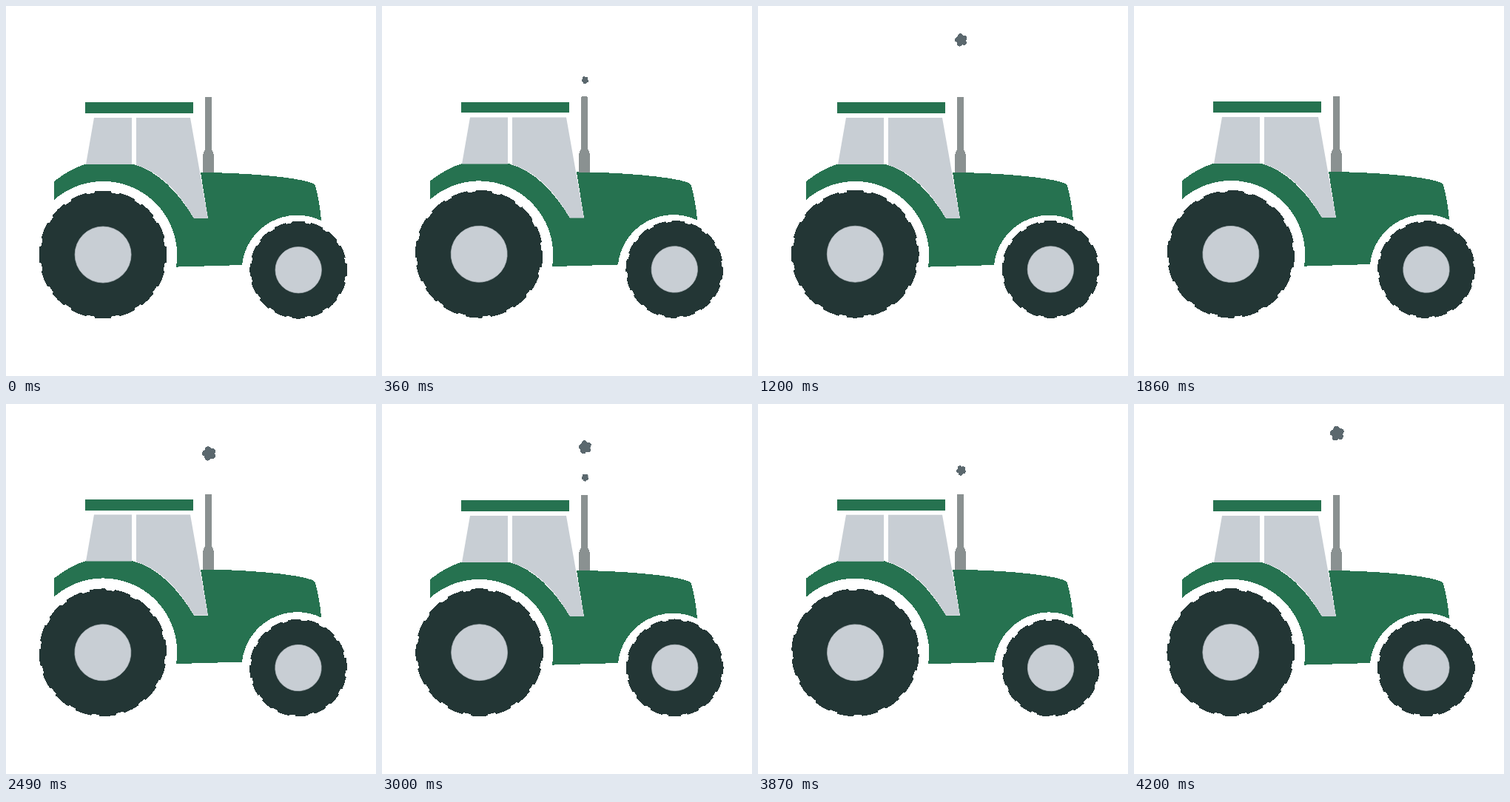
Write an HTML page that moves like this. It is 500 px wide and 500 px high and loops after 4230 ms.

```html
<!DOCTYPE html>
<html lang="en">
<head>
<meta charset="utf-8">
<title>Tractor</title>
<style>
  html, body { margin: 0; width: 100%; height: 100%; overflow: hidden; background: #fff; }
  svg { display: block; width: 100vw; height: 100vh; }
  .green, .tyre, .pipe, .smoke { shape-rendering: crispEdges; }
  .green { fill: #267250; }
  .glass { fill: #c8ced4; }
  .tyre { fill: #233635; }
  .hub { fill: #c8ced4; stroke: #b3bbc0; stroke-width: .7; }
  .pipe { fill: #8a9191; }
  .smoke { fill: #5b686e; }
</style>
</head>
<body>
<svg viewBox="0 0 500 500">
  <g id="smoke" class="smoke"></g>
  <g id="body">
    <path class="pipe" d="M269 124Q269 123 270 123H277Q278 123 278 124V194Q281 198 281 203V226H266V203Q266 198 269 194Z"/>
    <path class="green" d="M107 130.2H253V145H107Z"/>
    <path class="green" d="M65 237C79 226 93 218 108 213.5H171C206 223 232 251 254 287H273L263 225
      C320 225 392 231 413 239Q417 240.5 418 243C422 258 425 275 426 290
      A75 75 0 0 0 319 350L230 352.6A100 100 0 0 0 65 262Z"/>
    <path class="glass" d="M119 151H170V214H108Z"/>
    <path class="glass" d="M176 151H249L273 287H254C234 252 209 225 176 215Z"/>
  </g>
  <g id="wheels"></g>
</svg>
<script>
const LOOP = 4230, STEP = 30, TURN = 800, BOB = 200;
const PIPE_X = 274.5, PIPE_Y = 123;
const TAU = Math.PI * 2;

function add(parent, tag, attrs) {
  const el = document.createElementNS('http://www.w3.org/2000/svg', tag);
  for (const key in attrs) el.setAttribute(key, attrs[key]);
  return parent.appendChild(el);
}

// Ring of raised lugs around a tyre, the first one centred on angle 0
function treadPath(inner, outer, lugs) {
  const pt = (r, a) => (r * Math.cos(a)).toFixed(2) + ' ' + (r * Math.sin(a)).toFixed(2);
  const s = TAU / lugs;
  let d = 'M' + pt(inner, -s * 0.36);
  for (let i = 0; i < lugs; i++) {
    const a = i * s;
    d += `L${pt(outer, a - s * 0.32)}A${outer} ${outer} 0 0 1 ${pt(outer, a + s * 0.32)}`
       + `L${pt(inner, a + s * 0.36)}A${inner} ${inner} 0 0 1 ${pt(inner, a + s * 0.64)}`;
  }
  return d + 'Z';
}

const wheels = [
  { x: 131.2, y: 335.6, inner: 84.2, outer: 86.4, hub: 38 },
  { x: 395.3, y: 356.3, inner: 64, outer: 65.9, hub: 31.2 }
].map(w => {
  const el = add(document.getElementById('wheels'), 'g', {});
  add(el, 'path', { class: 'tyre', d: treadPath(w.inner, w.outer, 16) });
  add(el, 'circle', { class: 'hub', r: w.hub });
  return { ...w, el };
});

// start time, end time, speed in px/ms, full radius
const puffs = [
  [195, 830, 0.139, 9],
  [465, 1050, 0.139, 8.6],
  [725, 1235, 0.162, 8.7],
  [1865, 2310, 0.198, 9],
  [2087, 2700, 0.139, 10.3],
  [2510, 3100, 0.132, 9],
  [2830, 3460, 0.139, 9],
  [3650, 4230, 0.151, 10]
].map(([start, end, speed, size]) => {
  const el = add(document.getElementById('smoke'), 'g', {});
  add(el, 'circle', { r: 0.78 });
  for (let i = 0; i < 5; i++) {
    const a = i * TAU / 5 + 0.3, r = 0.4 + 0.04 * (i % 2);
    add(el, 'circle', { cx: 0.58 * Math.cos(a), cy: 0.58 * Math.sin(a), r });
  }
  return { start, end, speed, size, el };
});

const body = document.getElementById('body');

function draw(t) {
  const lift = 0.75 * (1 - Math.cos(TAU * t / BOB));
  body.setAttribute('transform', `translate(0 ${-lift})`);

  const turn = t / TURN * 360;
  for (const w of wheels)
    w.el.setAttribute('transform', `translate(${w.x} ${w.y}) rotate(${turn}) translate(-.1 .4)`);

  for (const p of puffs) {
    const age = t - p.start, on = age >= 0 && t < p.end;
    p.el.style.display = on ? '' : 'none';
    if (!on) continue;
    const rise = age * p.speed;
    const r = p.size * Math.min(1, 0.3 + rise / 87);
    p.el.setAttribute('transform',
      `translate(${PIPE_X} ${PIPE_Y - rise}) rotate(${age * 0.05}) scale(${r})`);
  }
}

const begin = performance.now();
function tick() {
  const t = (performance.now() - begin) % LOOP;
  draw(Math.floor(t / STEP) * STEP);
  requestAnimationFrame(tick);
}
draw(0);
requestAnimationFrame(tick);
</script>
</body>
</html>
```
